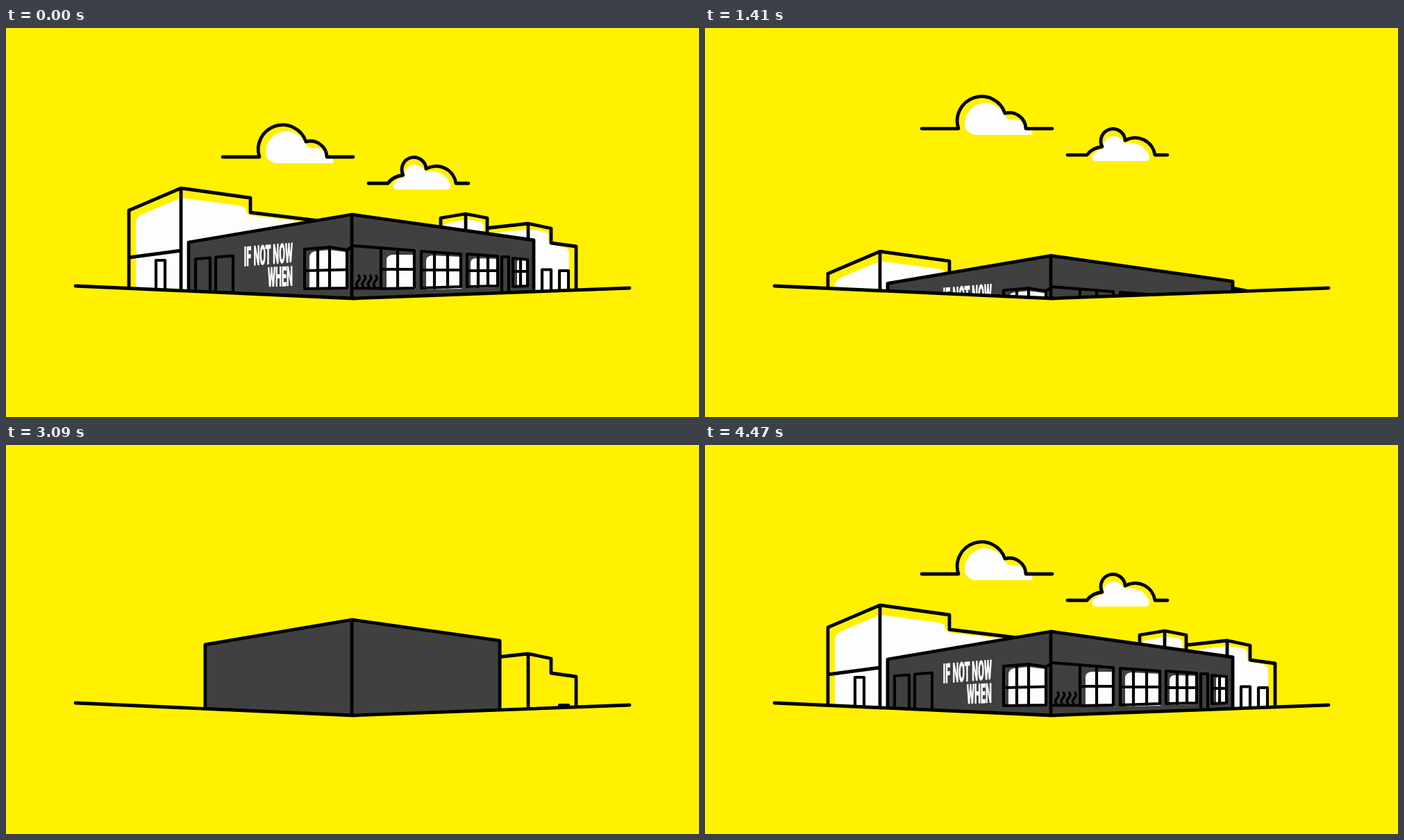
Write an HTML page that moves like this. It is 998x561 px and loops after 4.5 s.

```html
<!DOCTYPE html>
<html lang="en">
<head>
<meta charset="utf-8">
<title>Corner building</title>
<style>
  html, body { margin: 0; width: 100%; height: 100%; overflow: hidden; background: #fff100; }
  svg { display: block; width: 100%; height: 100%; }
  .line { fill: none; stroke: #000; stroke-width: 4.8; stroke-linecap: round; stroke-linejoin: round; }
  .thin { stroke-width: 4.2; }
  .body { fill: #fff100; }
  .white { fill: #fdfdfd; }
  .dark { fill: #404040; }
  text { font: 900 39px Roboto, "Liberation Sans", sans-serif; text-anchor: end; fill: #fdfdfd;
         stroke: #fdfdfd; stroke-width: .6; vector-effect: non-scaling-stroke; }
</style>
</head>
<body>
<svg viewBox="0 0 998 561" preserveAspectRatio="none">
  <clipPath id="above"><path id="sky"/></clipPath>

  <g id="clouds">
    <path class="white" d="M388 195Q374 191 374 180A30 30 0 0 1 431 166Q436 175 442 173Q454 171 460 182L463 188H470Q474 195 469 195Z"/>
    <path class="line" d="M312 186H365A35 35 0 0 1 432 164A23.500 23.500 0 0 1 462 186H500"/>
    <path class="white" d="M563 233Q556 232 558 225Q562 217 573 216Q574 197 589 197Q600 198 604 207Q618 205 630 212Q640 220 640 228Q640 233 634 233Z"/>
    <path class="line" d="M522 224H550Q557 214 572 212A17.500 17.500 0 1 1 605 203A29 29 0 0 1 648 224H666"/>
  </g>

  <g clip-path="url(#above)">
    <g id="tower">
      <path class="body" d="M177 560V263L252 231L352 245V266L450 278V560Z"/>
      <g id="towerFill"><path class="white" d="M187 560V281Q187 273 195 269L252 245L336 256Q345 257 346 264Q347 270 356 271L450 282V560Z"/></g>
      <path class="line" d="M177 560V263L252 231L352 245V266L450 278M252 231V560M177 331L252 321"/>
      <g id="towerDoor"><path class="line thin" d="M216 560V335H229V560"/></g>
    </g>

    <g id="right">
      <path class="body" d="M680 560V290L752 282L785 289V310L821 315V560Z"/>
      <g id="rightFill"><path class="white" d="M690 560V300L700 296L752 290L774 293Q781 294 781 301V308Q781 312 787 313L804 316Q811 318 811 325V560Z"/></g>
      <path class="line" d="M680 290L752 282L785 289V310L821 315V560M752 282V560"/>
    </g>
    <g id="doorA"><path class="line thin" d="M772 560V348.500H785V560"/></g>
    <g id="doorB"><path class="line thin" d="M797 560V350H810V560"/></g>

    <g id="unit">
      <path class="body" d="M626 305V274L662 268L693 274V305Z"/>
      <g id="unitFill"><path class="white" d="M628 340V290Q628 284 634 282L664 276L682 279Q688 280 688 287V340Z"/></g>
      <path class="line" d="M626 305V274L662 268L693 274V305M662 268V305"/>
    </g>

    <g id="hall">
      <path id="walls" class="line" style="fill:#404040"/>
      <g id="doorC"><path class="line thin" d="M273 560V333L294 331.500V560"/></g>
      <g id="doorD"><path class="line thin" d="M302 560V330.500L327 328.500V560"/></g>

      <g id="panes" class="white">
        <path d="M437 377V331Q437 324 445 322L466 320L489 323V377Z"/>
        <path d="M548 377V335Q548 328 556 327H590V377Z"/>
        <path d="M605 377V336Q605 329 613 328L656 330V376Z"/>
        <path d="M669 375V339Q669 333 676 332L709 333V374Z"/>
        <path d="M736 374V339Q736 334 741 333L752 334V373Z"/>
      </g>

      <g class="line thin">
        <path data-trim="3420 3780" d="M430 376V319L466 316L491 320V375Z"/>
        <path data-trim="3600 3840" d="M466 376V316"/>
        <path data-trim="3450 3810" d="M588 321V375L540 376V317"/>
        <path data-trim="3700 3990" d="M588 321L500 314L491 320"/>
        <path data-trim="3480 3840" d="M598 322L655 326V373L598 375Z"/>
        <path data-trim="3510 3840" d="M664 326L708 329V372L664 373Z"/>
        <path data-trim="3540 3840" d="M714 383V330H724V383"/>
        <path data-trim="3570 3870" d="M730 332L751 334V372L730 373Z"/>

        <path data-trim="3930 4200" d="M430 350L491 348.500"/>
        <path data-trim="3960 4230" d="M449 376V318"/>
        <path data-trim="3930 4200" d="M540 348H588"/>
        <path data-trim="3960 4230" d="M564 376V319"/>
        <path data-trim="3960 4230" d="M598 349H655"/>
        <path data-trim="3990 4230" d="M617 375V323"/>
        <path data-trim="4020 4260" d="M636 374V325"/>
        <path data-trim="3990 4260" d="M664 350H708"/>
        <path data-trim="4020 4260" d="M680 373V327"/>
        <path data-trim="4050 4290" d="M694 372V328"/>
        <path data-trim="4020 4290" d="M730 351H751"/>
        <path data-trim="4050 4290" d="M741 372V333"/>
        <path data-trim="3930 4170" d="M540 375.500H502"/>
      </g>
      <g id="steam" class="line" style="stroke-width:3.400"></g>

      <g id="sign">
        <text transform="matrix(.325 -.028 0 1 413 337.500)">IF NOT NOW</text>
        <text transform="matrix(.325 -.013 0 1 413 371.500)">WHEN</text>
      </g>
    </g>
  </g>

  <path id="ground" class="line"/>
</svg>

<script>
const LOOP = 4500, STEP = 30, EMPTY = 1800;
const $ = id => document.getElementById(id);
const clamp = p => Math.min(1, Math.max(0, p));
const span = (t, a, b) => clamp((t - a) / (b - a));
const sine = p => .5 - .5 * Math.cos(Math.PI * p);
const inOut = (p, n) => p < .5 ? (2 * p) ** n / 2 : 1 - (2 - 2 * p) ** n / 2;

// keys: time, value, time, value ...
function track(t, keys) {
  if (t <= keys[0]) return keys[1];
  for (let i = 2; i < keys.length; i += 2) {
    if (t < keys[i]) {
      const p = sine(span(t, keys[i - 2], keys[i]));
      return keys[i - 1] + (keys[i + 1] - keys[i - 1]) * p;
    }
  }
  return keys[keys.length - 1];
}

// vertical offsets while each part springs up
const rise = {
  hall: [2850, 135, 3030, -24, 3090, -17, 3240, 5, 3360, 0],
  right: [2910, 115, 3090, 19, 3240, -14, 3420, 0],
  doorA: [3090, 40, 3270, -8, 3400, 0],
  doorB: [2940, 60, 3090, 25, 3210, -8, 3330, 0],
  tower: [3100, 165, 3345, -31, 3500, 7, 3630, 0],
  towerDoor: [3390, 60, 3600, -10, 3750, 0],
  unit: [3300, 36, 3450, -8, 3570, 0],
  doorC: [3660, 70, 3870, -14, 3900, -13, 4050, 0],
  doorD: [3480, 70, 3690, -12, 3840, 0],
  towerFill: [3750, 160, 3900, 23, 4020, -6, 4200, 0],
  rightFill: [3780, 110, 3900, 40, 4020, -5, 4200, 0],
  unitFill: [3900, 32, 4050, -4, 4200, 0]
};
const back = ["tower", "right", "doorA", "doorB", "unit"];

$("steam").innerHTML = [0, 1, 2, 3].map(i =>
  `<path data-trim="${4050 + i * 30} ${4290 + i * 30}" d="M${506 + i * 8.3} 373q-3-4 1-8t1-8"/>`).join("");

const trims = [...document.querySelectorAll("[data-trim]")].map(el => {
  el.setAttribute("pathLength", 1);
  return [el, ...el.dataset.trim.split(" ").map(Number)];
});

const move = (id, y) => $(id).setAttribute("transform", `translate(0 ${y})`);
const grow = (id, y, s) => $(id).setAttribute("transform", `translate(0 ${y}) scale(1 ${s}) translate(0 ${-y})`);
const show = (id, on) => $(id).style.visibility = on ? "visible" : "hidden";

function drawGround(t, leaving) {
  let size, mid = 390, left, right;
  if (leaving) {
    size = 1 - inOut(span(t, 1415, EMPTY), 2);
    left = 390 - 18 * size;
    right = 390 - 15 * size;
  } else {
    size = inOut(span(t, 2250, 2900), 3);
    mid = track(t, [2640, 390, 2805, 423, 2940, 385, 3030, 390]);
    left = track(t, [2250, 390, 2640, 355, 2700, 346, 2820, 372]);
    right = track(t, [2250, 390, 2640, 371, 2820, 375]);
  }
  show("ground", size > 0);
  $("ground").setAttribute("d", `M${500 - 400 * size} ${left}L500 ${mid}L${500 + 398 * size} ${right}`);
  $("sky").setAttribute("d", `M0 0H998V375H898L500 ${mid}L100 372H0Z`);
}

function drawClouds(t, leaving) {
  show("clouds", leaving || t > 3930);
  if (!leaving) return move("clouds", track(t, [3930, 170, 4110, -74, 4270, 12, 4395, 0]));
  const lift = -41 * sine(span(t, 630, 1430));
  const s = 1 - span(t, 1430, EMPTY) ** 1.5;
  $("clouds").setAttribute("transform",
    `translate(500 131) scale(${s}) translate(-500 -131) translate(0 ${lift})`);
}

function drawWalls(t, leaving) {
  const open = dur => leaving ? 1 : 1 - (1 - span(t, 2850, 2850 + dur)) ** 3;
  const l = open(450), r = open(560);
  $("walls").setAttribute("d",
    `M${498 - 235 * l} 600V${269 + 40 * l}L498 269L${498 + 262 * r} ${269 + 37 * r}V600ZM498 269V600`);
}

function render(t) {
  const leaving = t < EMPTY;
  drawGround(t, leaving);
  drawClouds(t, leaving);
  drawWalls(t, leaving);

  const sinkBack = 160 * span(t, 779, 1540) ** 3;
  const sinkHall = 130 * span(t, 842, 1580) ** 3;
  for (const id in rise) {
    const sink = back.includes(id) ? sinkBack : id === "hall" ? sinkHall : 0;
    move(id, leaving ? sink : track(t, rise[id]));
  }
  const standing = leaving ? t < 1580 : t > 2850;
  [...back, "hall"].forEach(id => show(id, standing));

  for (const [el, a, b] of trims) {
    const p = leaving ? 1 : sine(span(t, a, b));
    el.style.display = p > 0 ? "" : "none";
    el.setAttribute("stroke-dasharray", p < 1 ? `${p} 2` : "none");
  }
  grow("panes", 377, leaving ? 1 : track(t, [4020, 0, 4230, 1.08, 4380, 1]));
  grow("sign", 372, leaving ? 1 : track(t, [4020, 0, 4230, 1.1, 4380, 1]));
}

const start = performance.now();
function frame() {
  const t = (performance.now() - start) % LOOP;
  render(Math.floor(t / STEP) * STEP);
  requestAnimationFrame(frame);
}
frame();
</script>
</body>
</html>
```
